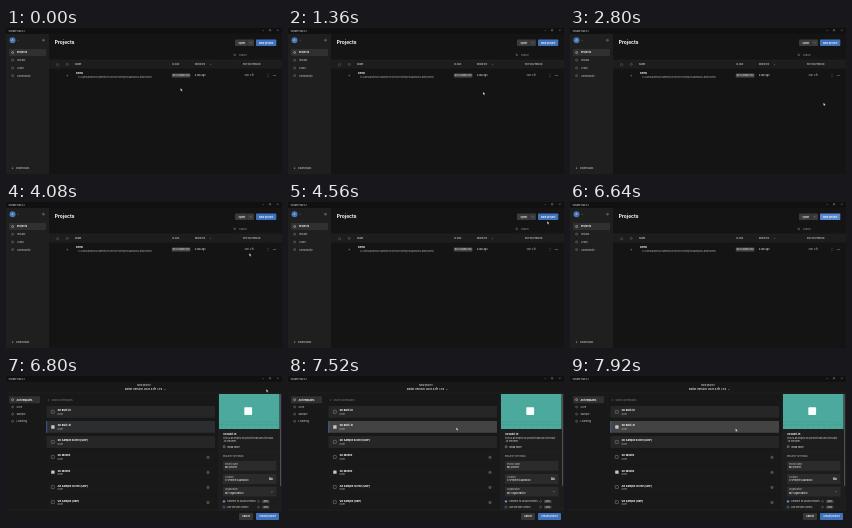
An HTML page for the animation above (8 s loop, 276x146 px).

```html
<!DOCTYPE html>
<html lang="en">
<head>
<meta charset="utf-8">
<title>Project launcher</title>
<style>
html, body { margin: 0; width: 100%; height: 100%; overflow: hidden; background: #141414; }
svg { display: block; width: 100vw; height: 100vh; }
text { font-family: Inter, Roboto, sans-serif; white-space: pre; }
</style>
</head>
<body>
<svg id="stage" viewBox="0 0 276 146">
  <g id="home"></g>
  <g id="dialog"></g>
  <g id="bar"></g>
  <path id="cursor" d="M0 0V2.8L.7 2.2L1.2 3.3L1.7 3L1.2 2H2.1Z" fill="#fff" stroke="#222" stroke-width=".2"/>
</svg>
<script>
const $ = id => document.getElementById(id);
const NS = 'http://www.w3.org/2000/svg';
let layer;

function add(tag, attrs, label) {
  const el = document.createElementNS(NS, tag);
  for (const k in attrs) el.setAttribute(k, attrs[k]);
  if (label) el.textContent = label;
  layer.appendChild(el);
  return el;
}
const box = (x, y, width, height, fill, rx = 0) => add('rect', { x, y, width, height, fill, rx });
const text = (x, y, label, size = 2.4, fill = '#c4c4c4', weight = 500, anchor = 'start') =>
  add('text', { x, y, fill, 'font-size': size, 'font-weight': weight, 'text-anchor': anchor }, label);
const line = (d, stroke = '#999', width = .4) =>
  add('path', { d, stroke, 'stroke-width': width, fill: 'none' });
const ring = (cx, cy, r, stroke = '#999', width = .4) =>
  add('circle', { cx, cy, r, stroke, 'stroke-width': width, fill: 'none' });
const frameIcon = (x, y, s, color = '#999') =>
  add('rect', { x, y, width: s, height: s, rx: .4, fill: 'none', stroke: color, 'stroke-width': .4 });
const chevron = (x, y, color = '#bbb') => line(`M${x - .8} ${y - .4}l.8 .8l.8 -.8`, color);

function menu(items, y, step, textX, width) {
  box(3, y - 4, width, 7, '#303030', .8);
  items.forEach((label, i) => {
    const cy = y + i * step;
    frameIcon(5.7, cy - 1.4, 1.8, i ? '#999' : '#eee');
    text(textX, cy + .4, label, 2.5, i ? '#bbb' : '#fff', i ? 500 : 700);
  });
}

function field(y, h, label, value) {
  box(217, y, 53.5, h, '#2b2b2b', .6);
  text(219, y + 3.6, label, 2.1, '#b5b5b5');
  text(219, y + 7.3, value, 2.4, '#eee');
}

// Title bar
layer = $('bar');
box(0, 0, 276, 5.6, '#101010');
text(2.5, 3.5, 'Vorlane Hub 3.1', 2.2, '#d0d0d0');
line('M256.5 2.5h1.6', '#aaa', .3);
frameIcon(263.3, 1.5, 1.5, '#aaa');
line('M271 1.5l1.6 1.6m0 -1.6l-1.6 1.6', '#aaa', .3);

// Project list
layer = $('home');
box(0, 0, 276, 146, '#141414');
box(0, 5.6, 43, 141, '#1f1f1f');
add('circle', { cx: 6.5, cy: 12.3, r: 3, fill: '#4677b4' });
text(6.5, 13.2, 'A', 2.5, '#dce9f8', 600, 'middle');
chevron(12.2, 12.3, '#777');
ring(37.5, 12.2, 1);
ring(37.5, 12.2, .3);
menu(['Projects', 'Installs', 'Learn', 'Community'], 25, 7.7, 11, 37);
line('M6.6 138.8v2m-.8 -.8l.8 .8l.8 -.8', '#aaa');
text(10, 141, 'Downloads', 2.5);

text(48.8, 16, 'Projects', 4.9, '#fff', 700);
box(229, 11.5, 19, 6.6, '#3b3b3b', .8);
text(232.5, 15.7, 'Open', 2.5, '#fff', 600);
line('M241.3 11.5v6.6', '#222', .4);
chevron(244.6, 14.8);
const newButton = box(250, 11.5, 20.3, 6.6, '#3f72bd', .8);
text(260.2, 15.7, 'New project', 2.5, '#fff', 600, 'middle');
ring(228.6, 26.7, .8, '#999');
line('M229.2 27.3l.8 .8', '#999');
text(233, 27.8, 'Search', 2.3, '#888');
line('M226 30.2H270.5', '#242424', .3);

box(43, 32, 233, 8.2, '#1d1d1d');
line('M43 32H276M43 40.2H276', '#2b2b2b', .3);
line('M51.6 35.2l.5 .9l1 .1l-.7 .7l.2 1l-1 -.5l-1 .5l.2 -1l-.7 -.7l1 -.1z', '#888', .25);
ring(61.3, 36.4, 1, '#aaa', .3);
[[69, 'NAME'], [166, 'CLOUD'], [189, 'MODIFIED'], [237, 'EDITOR VERSION']]
  .forEach(([x, label]) => text(x, 37.1, label, 2.1, '#c4c4c4', 600));
chevron(204.5, 36.4, '#999');
line('M60.3 47.6h2m-1 -1v2', '#aaa', .3);
text(70, 46.3, 'Demo', 2.5, '#fff', 700);
text(72, 49.7, 'C:\\Users\\arden\\Documents\\Projects\\Prototypes\\Sandbox\\Latest\\Demo', 2.2, '#a4a4a4');
box(165.8, 45.4, 18.6, 4, '#484848', .6);
text(175.1, 48.1, 'NOT CONNECTED', 1.95, '#ddd', 500, 'middle');
text(189, 48.3, 'a day ago', 2.3, '#d0d0d0');
text(238.6, 48.3, '2021.3.1f1', 2, '#c0c0c0');
line('M261 46.7l.9 -.8l.9 .8m-1.8 1.4l.9 .8l.9 -.8', '#888', .3);
[267.2, 268.5, 269.8].forEach(cx => add('circle', { cx, cy: 47.4, r: .35, fill: '#ccc' }));

// New project dialog
layer = $('dialog');
box(0, 5.6, 276, 141, '#181818');
text(138, 10, 'New project', 2.3, '#ddd', 500, 'middle');
text(137.5, 14.3, 'Editor Version: 2021.3.1f1  LTS', 2.6, '#eee', 600, 'middle');
chevron(158.9, 13.5);
line('M0 17H276', '#2a2a2a', .3);
line('M37 17V134', '#242424', .3);
menu(['All templates', 'Core', 'Sample', 'Learning'], 24.2, 7.2, 10.5, 31);
ring(42.4, 24, .7, '#777', .3);
text(45.5, 25, 'Search all templates', 2.2, '#777');

const rows = [
  ['2D Built-in', 'Core'], ['3D Built-in', 'Core'], ['3D Sample Scene [URP]', 'Core'],
  ['2D Mobile', 'Core'], ['3D Mobile', 'Core'], ['AR Sample Scene [URP]', 'Core'],
  ['VR Sample [URP]', 'Core']
].map(([name, kind], i) => {
  const y = 30 + i * 15.05;
  const base = i === 1 ? '#2c2d2f' : i < 3 ? '#262626' : '#191919';
  const bg = box(40.5, y, 168.5, 11.8, base, .6);
  if (i === 1) box(40.5, y, .6, 11.8, '#4a80cf');
  if (i % 3 === 1) box(45.2, y + 4.2, 3.4, 3.4, '#c4c4c4', .5);
  else frameIcon(45.3, y + 4.3, 3, '#aaa');
  text(51.6, y + 5.3, name, 2.6, '#fff', 700);
  text(51.6, y + 8.9, kind, 2.3, '#b8b8b8');
  if (i > 2) {
    ring(202, y + 6.2, 1.2, '#999', .4);
    line(`M202 ${y + 5.5}v1.3m-.5 -.5l.5 .5l.5 -.5`, '#aaa', .3);
  }
  return { bg, y, base, lit: i === 1 ? '#434343' : '#333' };
});

box(211.5, 17.2, 64.5, 117, '#1d1d1d');
box(213, 18, 60.5, 35, '#4ca99d');
// Floor grid under the cube
line('M213 46H273.5M213 48.6H273.5', '#438f87', .25);
for (let i = -5; i <= 5; i++) line(`M${243.2 + i * 5} 46L${243.2 + i * 6} 53`, '#438f87', .25);
box(238.3, 31.3, 7.8, 7.8, '#f7fffd', .8);
box(274.2, 18, .9, 92, '#606060', .4);
text(217, 59, '3D Built-in', 2.6, '#fff', 700);
text(217, 62.6, 'This is an empty 3D project that uses the built', 2.3, '#c4c4c4');
text(217, 66.1, '-in renderer.', 2.3, '#c4c4c4');
frameIcon(217.3, 69.8, 1.8, '#ccc');
text(221.5, 71.8, 'Read more', 2.4, '#ddd', 500);
line('M213 75.3H273.5', '#2c2c2c', .3);
text(217, 81.2, 'PROJECT SETTINGS', 2.1, '#aaa', 600);
field(85, 9.8, 'Project name', 'My project');
field(98, 10, 'Location', 'C:\\Projects\\Sandbox');
add('path', { d: 'M263 101.2h1.3l.5 .6h2v2.3h-3.8z', fill: '#999' });
field(110.7, 9.8, 'Organization', 'My organization');
chevron(266, 115.7);
box(216.8, 124.2, 2.4, 2.4, '#3f79cc', .4);
line('M217.3 125.4l.5 .5l.9 -1', '#fff', .35);
text(221, 126.2, 'Connect to cloud services', 2.3, '#d0d0d0');
ring(252.5, 125.4, .9, '#aaa', .3);
box(256, 124, 7.5, 2.9, '#444', .5);
text(259.7, 126.2, 'New', 1.9, '#ccc', 500, 'middle');
frameIcon(217, 130.1, 2, '#999');
text(221, 131.9, 'Use version control', 2.3, '#d0d0d0');
ring(252.5, 131.1, .9, '#aaa', .3);
box(256, 129.7, 7.5, 2.9, '#444', .5);
text(259.7, 131.9, 'Beta', 1.9, '#ccc', 500, 'middle');

box(0, 134, 276, 12, '#181818');
line('M0 134H276', '#303030', .3);
box(233, 137, 14, 7, '#363636', .8);
text(240, 141.4, 'Cancel', 2.4, '#fff', 600, 'middle');
box(250, 137, 23, 7, '#3f72bd', .8);
text(261.5, 141.4, 'Create project', 2.45, '#fff', 600, 'middle');

// Pointer stops: time, x, y
const LOOP = 8000, STEP = 80, OPEN_AT = 6800;
const path = [
  [0, 174.6, 60.3], [1120, 174.6, 60.3], [1840, 253.5, 74.8], [3040, 253.5, 74.8],
  [3920, 243.3, 51.3], [4080, 243.3, 51.3], [4560, 259.2, 19.2], [4800, 260.3, 13.3],
  [6800, 260.3, 13.3], [7600, 165.6, 52.6], [LOOP, 165.6, 52.6]
];
const ease = u => u * u * (3 - 2 * u);

function pointer(t) {
  const i = path.findIndex(p => p[0] > t);
  const [t0, x0, y0] = path[i - 1], [t1, x1, y1] = path[i];
  const u = ease((t - t0) / (t1 - t0));
  return [x0 + (x1 - x0) * u, y0 + (y1 - y0) * u];
}

function draw(ms) {
  const t = Math.floor((ms % LOOP) / STEP) * STEP;
  const [x, y] = pointer(t);
  const open = t >= OPEN_AT;
  $('dialog').style.display = open ? '' : 'none';
  $('cursor').setAttribute('transform', `translate(${x} ${y})`);
  newButton.setAttribute('fill', y > 11.5 && y < 18 && x > 250 ? '#5689d3' : '#3f72bd');
  for (const r of rows) {
    const over = x > 40.5 && x < 209 && y > r.y && y < r.y + 11.8;
    r.bg.setAttribute('fill', over ? r.lit : r.base);
  }
}

const start = performance.now();
(function tick() {
  draw(performance.now() - start);
  requestAnimationFrame(tick);
})();
</script>
</body>
</html>
```
